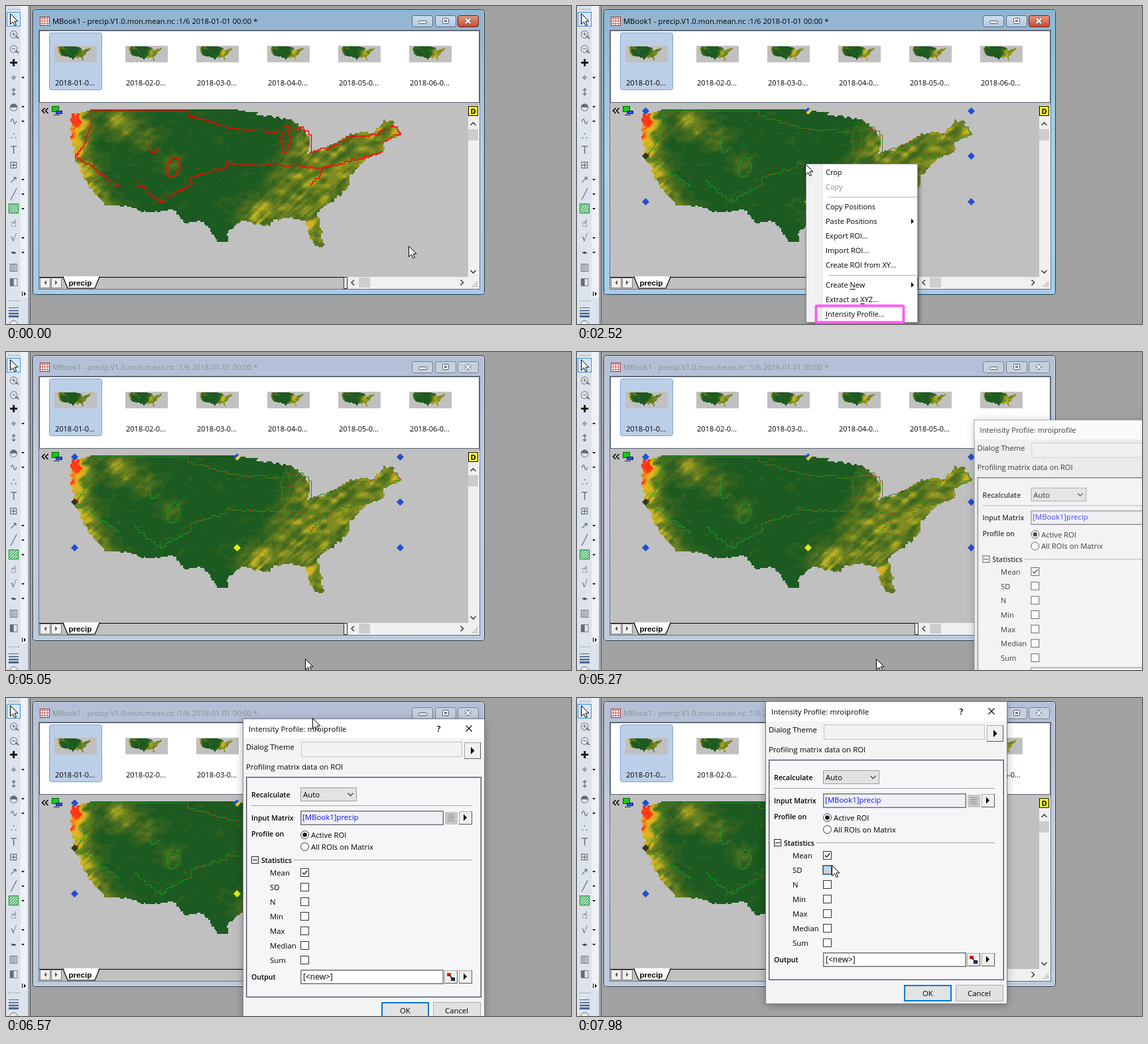
Recreate the animation shown at these times as an HTML page with a canvas. Size 852 by 480 pixels, loop 8 s.

```html
<!DOCTYPE html>
<html lang="en">
<head>
<meta charset="utf-8">
<title>Matrix ROI intensity profile</title>
<style>
html, body { margin: 0; width: 100%; height: 100%; overflow: hidden; background: #a2a2a2; }
canvas { display: block; }
</style>
</head>
<body>
<canvas id="stage" width="852" height="480"></canvas>
<script>
const LOOP = 8000;
const c = document.getElementById('stage').getContext('2d');
const UI = '"Open Sans", "Noto Sans", sans-serif';

// ---------- helpers ----------
function box(x, y, w, h, fill, line) {
  if (fill) { c.fillStyle = fill; c.fillRect(x, y, w, h); }
  if (line) { c.strokeStyle = line; c.lineWidth = 1; c.strokeRect(x + .5, y + .5, w - 1, h - 1); }
}
function paint(fill, line, width) {
  if (fill) { c.fillStyle = fill; c.fill(); }
  if (line) { c.strokeStyle = line; c.lineWidth = width; c.stroke(); }
}
function round(x, y, w, h, r, fill, line, width = 1) {
  c.beginPath(); c.roundRect(x, y, w, h, r);
  paint(fill, line, width);
}
function poly(pts, fill, line, width = 1) {
  c.beginPath();
  for (let i = 0; i < pts.length; i += 2) c.lineTo(pts[i], pts[i + 1]);
  if (fill) c.closePath();
  paint(fill, line, width);
}
function ring(x, y, r, fill, line, width = 1) {
  c.beginPath(); c.arc(x, y, r, 0, 7);
  paint(fill, line, width);
}
function text(s, x, y, size = 11.3, color = '#000', weight = '', family = UI) {
  c.font = `${weight} ${size}px ${family}`;
  c.fillStyle = color;
  c.fillText(s, x, y);
}
function ramp(y0, y1, ...colors) {
  const g = c.createLinearGradient(0, y0, 0, y1);
  colors.forEach((k, i) => g.addColorStop(i / (colors.length - 1), k));
  return g;
}
function shadow(blur, alpha, dx, dy) {
  c.shadowColor = `rgba(0,0,0,${alpha})`; c.shadowBlur = blur;
  c.shadowOffsetX = dx; c.shadowOffsetY = dy;
}
const right = (x, y, s, k = '#000') => poly([x, y - s, x + s, y, x, y + s], k);
const left = (x, y, s, k) => poly([x, y - s, x - s, y, x, y + s], k);
const down = (x, y, s, k = '#000') => poly([x - s, y, x + s, y, x, y + s], k);
const diamond = (x, y, k) => poly([x, y - 5.5, x + 5.5, y, x, y + 5.5, x - 5.5, y], k);
const sideways = (x, y, d, k = '#404040') => poly([x - d, y - 4, x + d, y, x - d, y + 4], 0, k, 1.6);
const upright = (x, y, d, k = '#404040') => poly([x - 4, y - d, x, y + d, x + 4, y - d], 0, k, 1.6);
function cross(x, y, r, k, w) {
  poly([x - r, y - r, x + r, y + r], 0, k, w);
  poly([x + r, y - r, x - r, y + r], 0, k, w);
}

const clamp = (v, a = 0, b = 1) => Math.max(a, Math.min(b, v));
const smooth = u => u * u * (3 - 2 * u);
const outBy = p => u => 1 - (1 - u) ** p;
const part = (v, a, b) => clamp((v - a) / (b - a));

// ---------- map ----------
function hash(x, y) {
  const s = Math.sin(x * 127.1 + y * 311.7) * 43758.5453;
  return s - Math.floor(s);
}
function noise(x, y) {
  const i = Math.floor(x), j = Math.floor(y), u = smooth(x - i), v = smooth(y - j);
  const a = hash(i, j) * (1 - u) + hash(i + 1, j) * u;
  const b = hash(i, j + 1) * (1 - u) + hash(i + 1, j + 1) * u;
  return a * (1 - v) + b * v;
}
const bump = (x, y, cx, cy, r) => Math.exp(-((x - cx) ** 2 + (y - cy) ** 2) / (r * r));

const CELL = 2.125, MAP_X = 95, MAP_Y = 156, COLS = 238, ROWS = 99;
const land = new Path2D();
const coast = [128,157, 97,165, 98,202, 104,228, 118,260, 133,281, 150,299, 183,302, 212,313, 252,308,
  270,327, 298,325, 317,353, 333,356, 333,340, 356,325, 399,332, 400,325, 430,319, 452,326, 457,346,
  470,364, 479,363, 476,338, 468,312, 516,276, 519,256, 543,231, 569,218, 568,206, 595,194, 584,175,
  570,173, 556,192, 520,193, 490,212, 456,222, 458,198, 432,172, 349,157];
for (let i = 0; i < coast.length; i += 2) land.lineTo(coast[i], coast[i + 1]);

// Rain amount: wet Pacific shore, a few ranges, a broad wet east with diagonal streaks.
function rain(x, y, month) {
  const shore = 98 + .13 * Math.max(0, y - 215) ** 1.3;
  const pacific = (.78 - .36 * part(y, 200, 300)) * Math.exp(-(((x - shore) / 27) ** 2))
    + .45 * bump(x, y, 102, 168, 12);
  const ranges = .5 * bump(x, y, 172, 176, 24) + .26 * bump(x, y, 212, 200, 20) + .3 * bump(x, y, 250, 240, 15);
  const east = .36 * smooth(part(x, 345 + (320 - y) * .45, 405 + (320 - y) * .45));
  const gulf = .34 * bump(x, y, 372, 318, 24) + .24 * bump(x, y, 461, 328, 15) + .16 * bump(x, y, 586, 188, 15);
  const storm = month ? .3 * bump(x, y, 390 + 70 * hash(month, 3), 270 - 50 * hash(month, 8), 45) : 0;
  const n = noise(x / 13 + month * 9, y / 8) * .5 + noise((x + y) / 6, (x * .5 + y) / 9 + month) * .5;
  const wet = (pacific + ranges) * (1 - .1 * month) + east * (1 + .05 * month) + gulf + storm;
  const v = wet * (.3 + 1.4 * n) + (noise(x / 9, y / 6) - .55) * .14;
  return x > 140 ? Math.min(v, .68) : v;
}
const tones = [[27,90,33], [66,105,31], [118,134,32], [190,178,33], [234,178,28], [255,58,20]];
function tone(v) {
  const s = Math.round(clamp(v) * 14) / 14 * (tones.length - 1);
  const i = Math.min(Math.floor(s), tones.length - 2);
  return tones[i].map((k, n) => Math.round(k + (tones[i + 1][n] - k) * (s - i)));
}
function drawMap(month) {
  const el = document.createElement('canvas');
  el.width = COLS; el.height = ROWS;
  const g = el.getContext('2d');
  for (let j = 0; j < ROWS; j++) for (let i = 0; i < COLS; i++) {
    const x = MAP_X + (i + .5) * CELL, y = MAP_Y + (j + .5) * CELL;
    const wobble = y < 161 ? 0 : 5;
    const wx = (noise(x / 5, y / 5) - .5) * wobble, wy = (noise(y / 5, x / 5) - .5) * wobble;
    if (!g.isPointInPath(land, x + wx, y + wy)) continue;
    g.fillStyle = `rgb(${tone(rain(x, y, month))})`;
    g.fillRect(i, j, 1, 1);
  }
  return el;
}
const maps = Array.from({ length: 6 }, (_, month) => drawMap(month));

// ---------- ROI outline ----------
const oval = (x, y, rx, ry) => Array.from({ length: 26 }, (_, i) => {
  const a = (i >> 1) / 12 * Math.PI * 2;
  return i % 2 ? y + ry * Math.sin(a) : x + rx * Math.cos(a);
});
function stairs(lines) {
  const path = new Path2D();
  const snap = v => Math.round(v / 2) * 2 + .5;
  for (const p of lines) {
    let py = snap(p[1]);
    path.moveTo(snap(p[0]), py);
    for (let i = 2; i < p.length; i += 2) {
      const dx = p[i] - p[i - 2], dy = p[i + 1] - p[i - 1];
      const n = Math.max(1, Math.round(Math.hypot(dx, dy) / 5));
      for (let k = 1; k <= n; k++) {
        const r = k < n && dx && dy ? 3 : 0;
        const x = snap(p[i - 2] + dx * k / n + (hash(k, p[i]) - .5) * r);
        path.lineTo(x, py);
        py = snap(p[i - 1] + dy * k / n + (hash(p[i], k) - .5) * r);
        path.lineTo(x, py);
      }
    }
  }
  return path;
}
const outline = stairs([
  [171,271, 125,238, 104,224, 118,206, 128,179, 128,158, 273,158, 273,166, 350,186, 412,190],
  [424,186, 444,182, 459,198, 459,220, 490,212, 512,198, 556,193, 582,180, 594,193, 567,207],
  [568,220, 505,238, 478,243, 332,237, 332,244, 278,258, 279,270, 235,295, 193,262],
  [478,243, 474,255, 460,272],
  [215,195, 217,222, 230,213],
  oval(421, 201, 6, 21), oval(252, 243, 9, 15)
]);
function roi(selected, handles) {
  c.strokeStyle = selected ? '#119a22' : '#ff0000';
  c.lineWidth = selected ? 1 : 1.3;
  c.stroke(outline);
  if (selected) {
    c.save();
    c.beginPath(); c.rect(274, 150, 330, 160); c.clip();
    c.setLineDash([3, 8, 2, 5]);
    c.strokeStyle = '#ff1408';
    c.stroke(outline);
    c.restore();
  }
  if (!handles) return;
  for (const x of [103.5, 348.5, 594.5]) for (const y of [158.5, 226.5, 295.5]) {
    if (x === 348.5 && y === 226.5) continue;
    const dark = x === 103.5 && y === 226.5, inverse = x === 348.5 && y === 295.5;
    diamond(x, y, dark ? '#33351c' : inverse ? '#e4ec14' : '#1f4fd2');
  }
  poly([348.5, 164, 354, 158.5, 351, 155.5, 345.5, 161], '#e8d020');
}

// ---------- toolbar ----------
const TOOLS = [...' ○○✚⌖↕◓∿∴T⊞↗╱▨☝√⌁▥◧'], STEP = 22;
function toolbar() {
  box(0, 0, 33, 480, '#dde3ec');
  box(22, 0, 11, 440, '#eef1f6');
  box(33, 0, 3, 480, '#a4a9b1');
  box(36, 0, 1, 480, '#50555c');
  for (let x = 4; x < 20; x += 3) for (const y of [4, 444]) box(x, y, 1, 2, '#8790a0');
  box(1, 9, 21, 22, '#d6e8fa', '#3f8ed8');
  arrow(6.5, 11.5);
  c.textAlign = 'center';
  TOOLS.forEach((glyph, i) => {
    const y = 20 + i * STEP;
    const ink = glyph === '▨' ? '#17a32b' : '✚☝⌁'.includes(glyph) ? '#151515' : '#666c76';
    text(glyph, 11.5, y + 5, glyph === '▨' ? 20 : 15, ink, '', '"DejaVu Sans", sans-serif');
    if (glyph === '○') {
      poly([14, y + 3, 19, y + 7], 0, ink, 2);
      box(9, y, 5, 1, ink);
      if (i === 1) box(11, y - 2, 1, 5, ink);
    }
    if ('⌖◓∿↗╱▨√⌁'.includes(glyph)) down(25.5, y - 1, 2.5);
  });
  c.textAlign = 'left';
  box(24, 431, 1, 7, '#000'); right(27, 434.5, 3);
  for (let i = 0; i < 4; i++) box(4, 455 + i * 4, 15, 1 + i * .7, '#4d6590');
  ring(11.5, 481, 6, '#eee', '#666c76');
}

// ---------- matrix window ----------
function titleBar(active) {
  const frame = active ? ramp(5, 436, '#92b3cf', '#b3cfe8', '#a8cce9') : ramp(5, 436, '#b3bfd6', '#c3cee0', '#bccade');
  round(40.5, 5.5, 681, 430, 4, frame, '#2f3b48');
  round(41.5, 6.5, 679, 428, 3, 0, active ? '#7fd6f4' : '#dbe3ee');
  box(51, 16, 15, 14, '#fff', '#8a2a2a');
  for (let k = 1; k < 4; k++) {
    box(50 + k * 4, 16, 1, 14, '#c46a62');
    box(51, 14 + k * 4, 15, 1, '#c46a62');
  }
  text('MBook1 - precip.V1.0.mon.mean.nc :1/6 2018-01-01 00:00 *', 70, 27, 11.2, active ? '#000' : '#84918e');
  const rim = active ? '#56677c' : '#76818f', dark = '#535d6a', ink = '#f4f7fa';
  for (const x of [612.5, 647.5, 681.5]) {
    const red = active && x > 680;
    round(x, 14.5, 31, 17, 3, red ? ramp(14, 32, '#e59a86', '#c8492c') : active ? ramp(14, 32, '#d0dfee', '#b0c8e0') : '#c6d0e0', red ? '#5c1d18' : rim);
  }
  round(622.5, 22.5, 12, 4, 1, ink, dark);
  round(658.5, 18.5, 9, 8, 1, ink, dark); box(661, 21, 4, 3, '#6d7a8a');
  cross(696.5, 22.5, 3.5, dark, 4.5);
  cross(696.5, 22.5, 3.5, ink, 2.5);
}
function thumbs() {
  box(50, 37, 664, 109, '#fff', '#59626c');
  round(65.5, 40.5, 79, 86, 3, '#bccfe8', '#7d9fd0');
  c.imageSmoothingEnabled = true;
  maps.forEach((m, i) => {
    const x = 73 + i * 107;
    box(x, 60, 64, 25, '#c0c0c0');
    c.drawImage(m, x + 5, 61, 51, 21);
    text(`2018-0${i + 1}-0...`, x + 1, 120, 11);
  });
}
function scrollbars() {
  box(697, 150, 17, 259, '#f0f0f0');
  box(697, 151, 15, 15, '#ffff20', '#000');
  text('D', 700.5, 162.5, 11, '#000', 'bold');
  upright(704.5, 178, -2); upright(704.5, 401, 2);
  box(697, 186, 15, 17, '#cdcdcd');

  box(50, 409, 664, 18, '#f0f0f0');
  box(50, 409, 460, 18, '#c0c0c0');
  box(50, 409, 460, 1, '#000');
  for (const x of [51, 68]) box(x, 410, 16, 16, '#f0f0f0', '#7f7f7f');
  left(61, 417.5, 3.5, '#555'); right(74, 417.5, 3.5, '#555');
  poly([86, 409, 93, 426, 134, 426, 141, 409], '#fff', '#000', 1.2);
  box(87, 408, 53, 2, '#fff');
  text('precip', 94.5, 422, 11.6, '#000', 'bold', '"Liberation Sans", Arial, sans-serif');
  box(509, 409, 6, 18, '#e8e8e8', '#333');
  sideways(523, 417.5, -2); sideways(687.5, 417.5, 2);
  box(532, 410, 17, 15, '#cdcdcd');
  for (let k = 0; k < 3; k++) for (let j = 0; j <= k; j++) box(709 - j * 3, 416 + k * 3, 2, 2, '#b4b4b4');
}
function matrixWindow(t) {
  titleBar(t < 5050);
  box(49, 36, 666, 392, '#eceff2', '#68727c');
  thumbs();
  box(50, 146, 664, 263, '#c0c0c0');
  sideways(56.5, 158, -2, '#000'); sideways(61.5, 158, -2, '#000');
  box(69, 151, 11, 9, '#12d012', '#0a5a0a');
  box(75, 158, 10, 5, '#2a4fe0', '#101a80'); box(72, 164, 9, 1, '#101a80');
  c.imageSmoothingEnabled = false;
  c.drawImage(maps[0], MAP_X, MAP_Y, COLS * CELL, ROWS * CELL);
  roi(t >= 1330, t >= 1360);
  scrollbars();
}

// ---------- context menu: '-' is a divider, '&' marks the underlined letter ----------
const entries = ['Crop', 'Copy', '-', 'Copy Positions', 'Paste Positions', 'Export ROI...', 'Import ROI...',
  'Create ROI from XY...', '-', 'Create &New', 'Extract as &XYZ...', '&Intensity Profile...'];
function menu(t, [mx, my]) {
  if (t < 2420 || t >= 4220) return;
  const full = t >= 2520 && t < 4190;
  c.save();
  if (!full) c.globalAlpha = .55;
  c.save(); shadow(6, .45, 2, 2); box(345, 238, 169, 240, '#fff'); c.restore();
  box(345, 238, 169, 240, '#fff', '#8f8f8f');
  box(346, 239, 23, 238, '#f1f1f1'); box(369, 239, 1, 238, '#dcdcdc');
  let y = 229;
  for (const entry of entries) {
    if (entry === '-') { box(379, y + 15, 134, 1, '#b8b8b8'); y += 8; continue; }
    y += 22;
    const off = entry === 'Copy', name = entry.replace('&', ''), mark = entry.indexOf('&');
    if (!off && mx > 345 && Math.abs(my - y) < 11)
      round(347.5, y - 10.5, 163, 21, 3, ramp(y - 10, y + 11, '#f4f8fc', '#d8e6f2'), '#a5cbe2');
    text(name, 375, y + 4, 11, off ? '#8a8a8a' : '#000');
    if (mark >= 0)
      box(375 + c.measureText(name.slice(0, mark)).width, y + 6, c.measureText(name[mark]).width, 1, '#000');
    if (/^Paste|New$/.test(name)) right(504, y, 4);
  }
  c.restore();
  if (full) round(360.5, 452.5, 132, 25, 2, 0, '#ff5cf0', 4);
}

// ---------- dialog, laid out at its resting place ----------
const REST = [285, 6], GRAB = [159, 14], LAG = 66;
const label = (s, x, y) => text(s, x, y, 11.35);
const strong = (s, x, y) => text(s, x, y, 10.6, '#000', '600');
function pushButton(x, y, size) {
  box(x, y, size, size, '#f0f0f0', '#a8a8a8');
  box(x, y + size - 1, size, 1, '#555'); box(x + size - 1, y, 1, size, '#555');
}
function sunken(x, y, w, h, fill) {
  box(x, y, w, h, fill, '#6c6c74'); box(x + 1, y + 1, w - 2, h - 2, 0, '#b9b9c0');
}
function checkbox(x, y, on, hover, focus) {
  box(x, y, 13, 13, focus ? '#cdd2dd' : '#fff', hover ? '#0078d7' : '#333');
  if (on) poly([x + 3, y + 6.5, x + 5.5, y + 9, x + 10.5, y + 3.5], 0, '#111', 1.3);
  if (focus) { c.setLineDash([1, 1]); box(x - 1, y - 1, 15, 15, 0, '#000'); c.setLineDash([]); }
}
function dialog(t) {
  if (t < 5150) return;
  const hold = pointerAt(clamp(t - LAG, 6360, 6720));
  const fade = outBy(2)(part(t, 5150, 5390)), s = .94 + .06 * fade;
  c.save();
  c.globalAlpha = fade;
  c.translate(hold[0] - GRAB[0] - REST[0], hold[1] - GRAB[1] - REST[1]);
  c.translate(466, 233); c.scale(s, s); c.translate(-466, -233);
  c.save(); shadow(12, .35, 0, 2); box(285, 6, 363, 455, '#f4f4f5'); c.restore();
  box(284, 5, 365, 457, '#f4f4f5', '#7d8087');
  box(285, 6, 363, 29, '#fff');
  label('Intensity Profile: mroiprofile', 293, 25);
  text('?', 576.5, 25, 13, '#000', '600');
  cross(625, 20, 4.5, '#111', 1.3);
  label('Dialog Theme', 289, 52);
  box(372, 40, 243, 23, '#f2f2f3', '#c4c4c6');
  pushButton(618, 41, 25); right(628, 53.5, 5.5);
  label('Profiling matrix data on ROI', 289, 82);
  box(289, 93, 355, 333, '#f6f5f8', '#4d4d59');
  box(290, 94, 353, 331, 0, '#b6b6c2');

  strong('Recalculate', 297, 124);
  box(371, 109, 85, 21, '#e2e2e2', '#9c9c9c');
  label('Auto', 375, 124);
  upright(446.5, 119.5, 2, '#555');
  box(297, 136, 333, 1, '#a0a0a6');
  strong('Input Matrix', 297, 159);
  sunken(371, 144, 216, 22, '#efeff4');
  text('[MBook1]precip', 374, 158, 11.4, '#1010e8');
  box(589, 146, 19, 19, '#c6c6c8');
  for (let k = 0; k < 4; k++) box(593, 150 + k * 3, 10, 1, '#929296');
  for (const y of [145, 385]) { pushButton(610, y, 20); right(617, y + 9.5, 5); }
  strong('Profile on', 297, 183);
  ['Active ROI', 'All ROIs on Matrix'].forEach((name, i) => {
    ring(377.5, 180.5 + i * 18, 6, '#fff', '#333');
    if (!i) ring(377.5, 180.5, 3.3, '#111');
    label(name, 387, 185 + i * 18);
  });

  box(297, 213, 11, 11, '#fff', '#222'); box(299, 218, 7, 1, '#000');
  strong('Statistics', 312, 223);
  box(361, 218, 269, 1, '#a0a0a6');
  ['Mean', 'SD', 'N', 'Min', 'Max', 'Median', 'Sum'].forEach((name, i) => {
    label(name, 325, 242 + i * STEP);
    checkbox(371, 231 + i * STEP, i === 0, i === 1 && t >= 7770, i === 1 && t >= 7860);
  });
  strong('Output', 297, 399);
  sunken(371, 384, 216, 22, '#fff');
  text('[<new>]', 375, 399, 12);
  pushButton(588, 385, 20);
  box(592, 389, 6, 5, '#e02020'); box(598, 396, 6, 5, '#2a3fa0', '#111');
  poly([595, 392, 602, 399], 0, '#111', 1.2);

  box(493, 433, 72, 25, '#e2e2e2', '#0078d7'); box(494, 434, 70, 23, 0, '#0078d7');
  label('OK', 521, 450);
  box(571, 433, 72, 25, '#e2e2e2', '#adadad');
  label('Cancel', 589, 450);
  c.restore();
}

// ---------- pointer: start, end, x, y, ease ----------
const moves = [
  [460, 910, 349, 243, smooth], [1070, 1130, 344, 238, smooth], [2820, 3390, 451, 463, smooth],
  [5750, 5930, 708, 86, smooth], [5930, 6200, 756, 114, smooth],
  [6360, 6570, 462, 30, outBy(1.43)], [6570, 6654, 444, 20, outBy(2)],
  [7050, 7830, 384, 252, smooth]
];
function pointerAt(t) {
  let x = 607, y = 362;
  for (const [a, b, tx, ty, ease] of moves) {
    const u = ease(part(t, a, b));
    x += (tx - x) * u; y += (ty - y) * u;
  }
  return [Math.round(x), Math.round(y)];
}
function arrow(x, y) {
  c.save();
  c.translate(x, y);
  poly([0, 0, 0, 16, 4, 12.5, 6.5, 18, 9, 17, 6.5, 11.5, 11.5, 11.5], '#fff', '#000');
  c.restore();
}

function draw() {
  const t = performance.now() % LOOP;
  const p = pointerAt(t);
  box(0, 0, 852, 480, '#a2a2a2');
  toolbar();
  matrixWindow(t);
  menu(t, p);
  dialog(t);
  arrow(p[0] + .5, p[1] + .5);
  requestAnimationFrame(draw);
}
draw();
</script>
</body>
</html>
```
